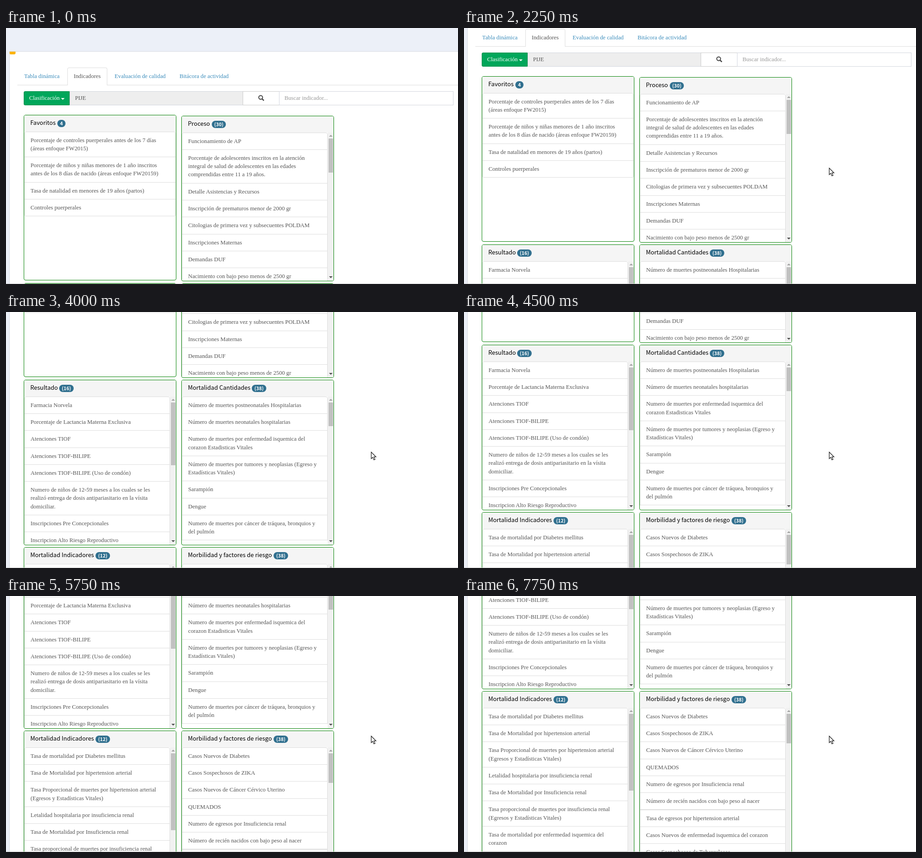
These frames come from a looping animation (995x563 px, 8 s). An HTML page:

```html
<!DOCTYPE html>
<html lang="es">
<head>
<meta charset="utf-8">
<title>Indicadores</title>
<style>
* { box-sizing: border-box; }
html, body { margin: 0; width: 100%; height: 100%; overflow: hidden; }
body { position: relative; background: #ecf0f8; color: #555; font: 12.74px/18.2px "Liberation Serif", "Times New Roman", serif; }
#page, #page > *, .title, .badge, .bar, .bar *, #cursor, #status, #edge { position: absolute; }
#page { left: 0; top: 0; width: 995px; height: 1500px; will-change: transform; }
.sheet { left: 7px; top: 51px; width: 1000px; height: 1449px; background: #fff; border: 1px solid #d6d9e0; }
.mark { left: 8px; top: 52px; width: 13px; height: 6px; background: #fcb40c; border-radius: 0 0 3px 2px; }
.rule { left: 25px; top: 125px; width: 970px; height: 1px; background: #ddd; }
.tab { top: 97px; color: #3c8dbc; white-space: pre; }
.active { left: 135px; top: 87px; width: 88px; height: 39px; background: #fff; border: 1px solid #ddd; border-bottom: 0; border-radius: 4px 4px 0 0; color: #555; padding: 9px 13px; }
.field { top: 139px; height: 31px; padding: 5px 11px; border: 1px solid #d2d6de; background: #fff; white-space: pre; }
.green { background: #00a65a; border-color: #008d4c; color: #fff; border-radius: 3px 0 0 3px; }
.green::after { content: ""; position: absolute; left: 81px; top: 14px; border: 4px solid transparent; border-top-color: #fff; border-bottom: 0; }
.panel { width: 336px; height: 364px; border: 1px solid #008000; border-radius: 4px; background: #fff; overflow: hidden; }
.head { position: relative; height: 35.6px; background: #f5f5f5; }
.title { left: 13.4px; top: 0; color: #000; white-space: pre; font: 13px/32.6px "Noto Sans CJK JP", "Noto Sans CJK SC", "Noto Sans CJK", sans-serif; }
.badge { top: 10px; height: 16px; border-radius: 8px; background: #31708f; color: #fff; text-align: center; font: bold 10.5px/15px "Noto Sans CJK JP", "Noto Sans CJK SC", "Noto Sans", sans-serif; }
.list { position: relative; height: 326.4px; overflow: hidden; }
.item { padding: 9.1px 13px; border: 1px solid #ddd; margin-bottom: -1.09px; white-space: pre; }
.item:first-child { border-radius: 4px 4px 0 0; }
.item.last { border-radius: 0 0 4px 4px; }
.scroll .item { margin-right: 13px; }
.bar { right: 0; top: 0; width: 13px; height: 100%; background: #f1f1f1; }
.thumb { left: 2px; top: 13.4px; width: 10px; background: #c1c1c1; }
.up, .down { left: 3px; border: 4px solid transparent; }
.up { top: 5px; border-bottom-color: #a3a3a3; border-top: 0; }
.down { bottom: 6px; border-top-color: #505050; border-bottom: 0; }
#status { left: -4px; top: 541px; width: 207px; height: 21px; background: #dedede; border: 1px solid #cfcfcf; border-radius: 0 3px 0 0; color: #666; padding-left: 2px; font: 11px/20px "Noto Sans", sans-serif; }
#edge { left: 0; top: 562px; width: 995px; height: 1px; background: #c8c8c8; }
#cursor { left: 0; top: 0; }
</style>
</head>
<body>
<div id="page">
  <div class="sheet"></div>
  <div class="mark"></div>
  <div class="rule"></div>
  <div class="tab" style="left:40px">Tabla dinámica</div>
  <div class="active">Indicadores</div>
  <div class="tab" style="left:239px">Evaluación de calidad</div>
  <div class="tab" style="left:382px">Bitácora de actividad</div>
  <div class="field" style="left:140px;width:382px;background:#eee">PIJE</div>
  <div class="field green" style="left:39px;width:101px">Clasificación</div>
  <div class="field" style="left:521px;width:81px;border-color:#ccc"></div>
  <svg style="left:555px;top:147px" width="14" height="14" fill="none" stroke="#444" stroke-width="2"><circle cx="5.6" cy="5.6" r="4.2"/><path d="M8.6 8.6L12.6 12.6" stroke-width="2.6"/></svg>
  <div class="field" style="left:601px;width:384px;color:#999">Buscar indicador...</div>
</div>
<div id="status">dicadores</div>
<div id="edge"></div>
<svg id="cursor" width="13" height="20"><path d="M1 1V15.6L4.4 12.6 6.8 18.2 9.4 17.1 7 11.7H11.5Z" fill="#fff" stroke="#222" stroke-width="1.3"/></svg>
<script>
const panels = [
  { x: 39, y: 191, title: "Favoritos", count: "4", badge: [73, 18], items: [
    "Porcentaje de controles puerperales antes de los 7 días\n(áreas enfoque FW2015)",
    "Porcentaje de niños y niñas menores de 1 año inscritos\nantes de los 8 días de nacido (áreas enfoque FW20159)",
    "Tasa de natalidad en menores de 19 años (partos)",
    "Controles puerperales"] },
  { x: 386, y: 193, title: "Proceso", count: "(30)", badge: [66, 31], thumb: 75, items: [
    "Funcionamiento de AP",
    "Porcentaje de adolescentes inscritos en la atención\nintegral de salud de adolescentes en las edades\ncomprendidas entre 11 a 19 años.",
    "Detalle Asistencias y Recursos",
    "Inscripción de prematuros menor de 2000 gr",
    "Citologias de primera vez y subsecuentes POLDAM",
    "Inscripciones Maternas",
    "Demandas DUF",
    "Nacimiento con bajo peso menos de 2500 gr"] },
  { x: 39, y: 561, title: "Resultado", count: "(16)", badge: [77, 32], thumb: 138, items: [
    "Farmacia Norvela",
    "Porcentaje de Lactancia Materna Exclusiva",
    "Atenciones TIOF",
    "Atenciones TIOF-BILIPE",
    "Atenciones TIOF-BILIPE (Uso de condón)",
    "Numero de niños de 12-59 meses a los cuales se les\nrealizó entrega de dosis antipariasitario en la vísita\ndomiciliar.",
    "Inscripciones Pre Concepcionales",
    "Inscripcion Alto Riesgo Reproductivo"] },
  { x: 386, y: 561, title: "Mortalidad Cantidades", count: "(38)", badge: [154, 32], thumb: 52, items: [
    "Número de muertes postneonatales Hospitalarias",
    "Número de muertes neonatales hospitalarias",
    "Numero de muertes por enfermedad isquemica del\ncorazon Estadisticas Vitales",
    "Número de muertes por tumores y neoplasias (Egreso y\nEstadísticas Vitales)",
    "Sarampión",
    "Dengue",
    "Numero de muertes por cáncer de tráquea, bronquios y\ndel pulmón"] },
  { x: 39, y: 929, title: "Mortalidad Indicadores", count: "(12)", badge: [157, 32], thumb: 169, items: [
    "Tasa de mortalidad por Diabetes mellitus",
    "Tasa de Mortalidad por hipertension arterial",
    "Tasa Proporcional de muertes por hipertension arterial\n(Egresos y Estadísticas Vitales)",
    "Letalidad hospitalaria por insuficiencia renal",
    "Tasa de Mortalidad por Insuficiencia renal",
    "Tasa proporcional de muertes por insuficiencia renal\n(Egresos y Estadísticas Vitales)",
    "Tasa de mortalidad por enfermedad isquemica del\ncorazon"] },
  { x: 386, y: 929, title: "Morbilidad y factores de riesgo", count: "(38)", badge: [202, 32], thumb: 65, items: [
    "Casos Nuevos de Diabetes",
    "Casos Sospechosos de ZIKA",
    "Casos Nuevos de Cáncer Cérvico Uterino",
    "QUEMADOS",
    "Numero de egresos por Insuficiencia renal",
    "Número de recién nacidos con bajo peso al nacer",
    "Tasa de egresos por hipertension arterial",
    "Casos Nuevos de enfermedad isquemica del corazon",
    "Casos Sospechosos de Tuberculosos"] }
];

const byId = id => document.getElementById(id);
const page = byId("page"), cursor = byId("cursor"), statusBar = byId("status");

function add(parent, cls, text = "", style = {}) {
  const el = document.createElement("div");
  el.className = cls;
  el.textContent = text;
  Object.assign(el.style, style);
  parent.append(el);
  return el;
}

for (const p of panels) {
  const box = add(page, "panel", "", { left: p.x + "px", top: p.y + "px" });
  const head = add(box, "head");
  add(head, "title", p.title);
  add(head, "badge", p.count, { left: p.badge[0] + "px", width: p.badge[1] + "px" });
  const list = add(box, p.thumb ? "list scroll" : "list");
  p.items.forEach((text, i) =>
    add(list, !p.thumb && i === p.items.length - 1 ? "item last" : "item", text));
  if (p.thumb) {
    const bar = add(list, "bar");
    add(bar, "up");
    add(bar, "thumb", "", { height: p.thumb + "px" });
    add(bar, "down");
  }
}

// Each row: start time in ms, then the values held from there on.
const LOOP = 8000;
const scrollSteps = [[0, 0], [2000, 1], [2250, 85], [2500, 195], [2750, 289], [3500, 292],
  [3750, 360], [4000, 412], [4250, 450], [4500, 489], [4750, 560], [5000, 627],
  [5750, 633], [6000, 662], [6500, 668], [7500, 690], [7750, 720]];
const cursorSteps = [[0, -50, -50], [250, 145, 46], [500, 158, 81], [750, 167, 104],
  [1000, 174, 111], [1250, 334, 226], [1500, 803, 307]];
const statusSteps = [[0, 0], [1000, 1], [1750, 0.5], [2000, 0]];

const at = (steps, t) => steps.findLast(s => s[0] <= t);

function draw() {
  const t = performance.now() % LOOP;
  const [, x, y] = at(cursorSteps, t);
  page.style.transform = `translateY(${-at(scrollSteps, t)[1]}px)`;
  cursor.style.transform = `translate(${x}px, ${y}px)`;
  statusBar.style.opacity = at(statusSteps, t)[1];
  requestAnimationFrame(draw);
}
draw();
</script>
</body>
</html>
```
